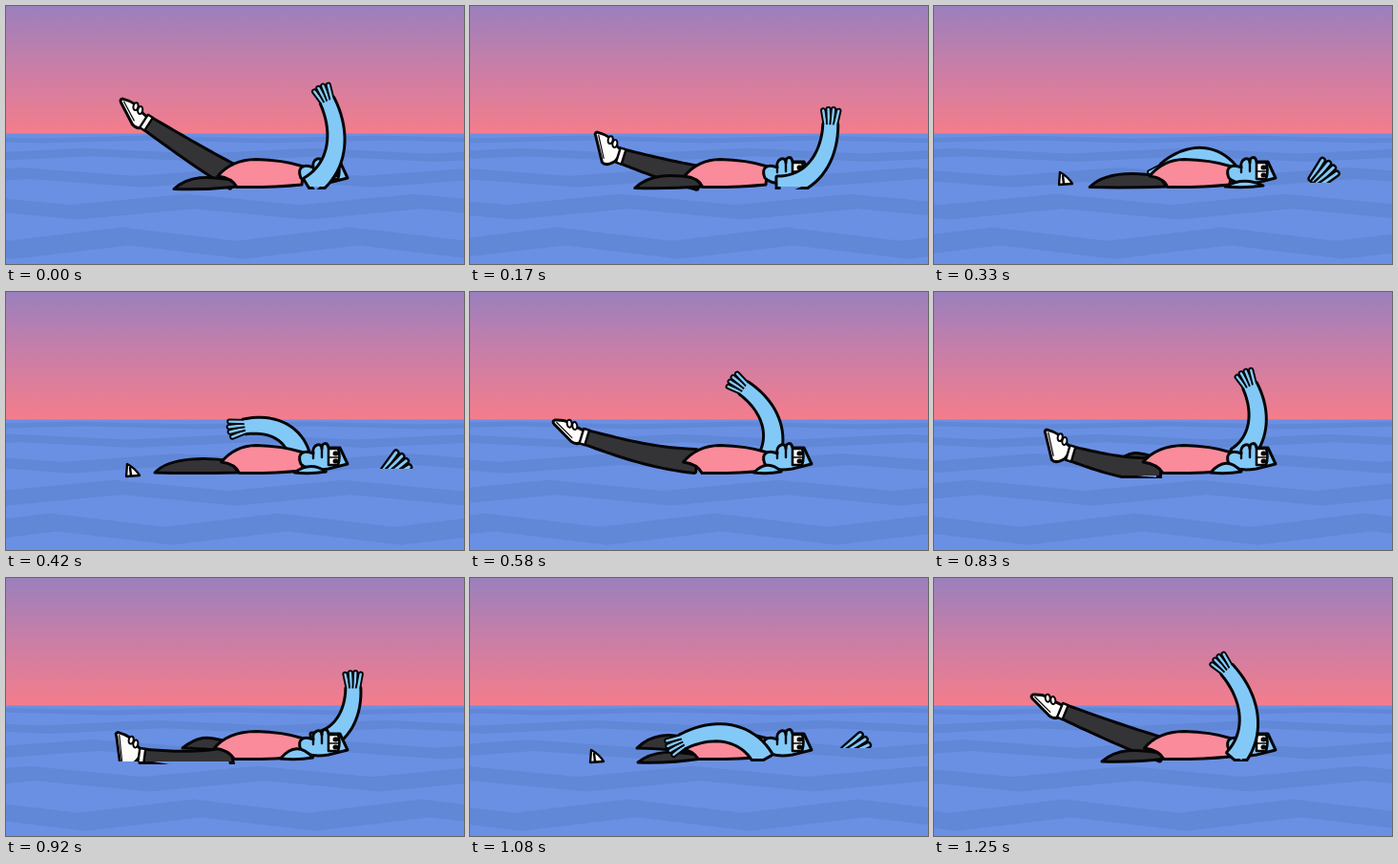
Write an HTML page with a canvas that moves like this. It is 480 by 270 pixels and loops after 1330 ms.

```html
<!DOCTYPE html>
<html lang="en">
<head>
<meta charset="utf-8">
<title>Backstroke</title>
<style>
  html, body { margin: 0; width: 100%; height: 100%; overflow: hidden; background: #6a90e4; }
  canvas { display: block; width: 480px; height: 270px; }
</style>
</head>
<body>
<canvas id="stage" width="480" height="270"></canvas>
<script>
const ctx = document.getElementById('stage').getContext('2d');
const LOOP = 1330, STEPS = 16, HALF = STEPS / 2;
const INK = '#050507', SKIN = '#83c9f8', SUIT = '#f98b9b', LEG = '#343436', WHITE = '#fffdfa';
const startOf = i => Math.round(i * 100 / 12) * 10;   // twelve drawings a second
const mix = (a, b, t) => a + (b - a) * t;

// Arm angle in degrees by stroke step: 180 at the hips, 90 straight up, 0 overhead.
const NEAR_ARM = { sweep: [[-4, 184], [-3, 171], [-1, 93], [0, 74], [2, 43], [4, 2], [5, -2]], rx: 90, grow: 0, y: 189, bend: 24 };
const FAR_ARM = { sweep: [[-5, 190], [-4, 171], [-1, 109], [2, 76], [5, 2]], rx: 78, grow: 8, y: 173, bend: 19 };
const NEAR_LEG = { x: 132, top: 134, hipX: 236, hipY: 180, sink: 3, sag: 7, width: 22 };
const FAR_LEG = { x: 147, top: 122, hipX: 240, hipY: 180, sink: 0, sag: 2, width: 22 };

function sweepAt(keys, p) {
  for (let k = 1; k < keys.length; k++) {
    const [p0, a0] = keys[k - 1], [p1, a1] = keys[k];
    if (p >= p0 && p <= p1) return mix(a0, a1, (p - p0) / (p1 - p0));
  }
  return null;
}

function shape(d, fill, w = 3) {
  const path = new Path2D(d);
  if (fill) { ctx.fillStyle = fill; ctx.fill(path); }
  if (w) { ctx.strokeStyle = INK; ctx.lineWidth = w; ctx.stroke(path); }
}

function above(y, paint) {
  ctx.save();
  ctx.beginPath();
  ctx.rect(0, 0, 480, y);
  ctx.clip();
  paint();
  ctx.restore();
}

// Tapered outline along a cubic curve.
function ribbon([a, b, c, d], w0, w1) {
  const left = [], right = [];
  for (let k = 0; k <= 20; k++) {
    const t = k / 20, s = 1 - t;
    const at = j => s * s * s * a[j] + 3 * s * s * t * b[j] + 3 * s * t * t * c[j] + t * t * t * d[j];
    const slope = j => s * s * (b[j] - a[j]) + 2 * s * t * (c[j] - b[j]) + t * t * (d[j] - c[j]);
    const h = mix(w0, w1, t) / 2 / Math.hypot(slope(0), slope(1));
    left.push([at(0) - slope(1) * h, at(1) + slope(0) * h]);
    right.unshift([at(0) + slope(1) * h, at(1) - slope(0) * h]);
  }
  return 'M' + left.concat(right).join('L') + 'Z';
}

function hand([x, y], dir, size = 1) {
  ctx.save();
  ctx.translate(x, y);
  ctx.rotate(dir);
  ctx.scale(size, size);
  for (let k = -1.5; k <= 1.5; k++) {
    const len = 17 - Math.abs(k) * 1.5;
    for (const [w, c] of [[6.2, INK], [2.4, SKIN]]) {
      ctx.beginPath();
      ctx.moveTo(-3, k * 3);
      ctx.lineTo(len, k * 5.4);
      ctx.lineWidth = w;
      ctx.strokeStyle = c;
      ctx.stroke();
    }
  }
  ctx.restore();
}

function arm(o, p, water) {
  const deg = sweepAt(o.sweep, p);
  if (deg === null) return;
  const cos = Math.cos(deg * Math.PI / 180), sin = Math.sin(deg * Math.PI / 180);
  const s = [316 + 9 * cos, o.y];
  const w = [312 + (o.rx + o.grow * cos) * cos, 185 - 89 * sin];
  const dx = w[0] - s[0], dy = w[1] - s[1], len = Math.hypot(dx, dy);
  const bow = t => [s[0] + dx * t - dy / len * o.bend, s[1] + dy * t + dx / len * o.bend];
  const c = bow(0.65), dir = Math.atan2(w[1] - c[1], w[0] - c[0]);
  if (deg < 15) {
    above(water - 4, () => hand(w, dir, 1.25));
    return;
  }
  const path = ribbon([s, bow(0.25), c, w], 19, 13);
  above(water + 3, () => { shape(path, null, 6); hand(w, dir); });
  above(water, () => shape(path, SKIN, 0));
}

function shoe(x, y, angle, heel) {
  ctx.save();
  ctx.translate(x, y);
  ctx.rotate(angle * Math.PI / 180);
  // Laces on +y, sole on -y.
  shape(`M0,7 L8,6 Q20,9 33,0 Q35,-3 31,-4 L6,${-heel} Q0,${-heel} -2,-6 Z`, WHITE);
  shape(`M30,-1 L8,${4 - heel}`, null, 1.2);
  for (const k of [0, 1]) {
    ctx.beginPath();
    ctx.ellipse(12 + k * 6, 6 - k, 4, 2.5, 0.9, 0, 7);
    ctx.fillStyle = WHITE;
    ctx.fill();
    ctx.lineWidth = 2;
    ctx.stroke();
  }
  ctx.restore();
}

// A kick peaks at step 0; after step 3 only the toe is out of the water.
function leg(o, q) {
  if (q === 4 || q === 5) {
    const x = 137 - 5 * q + 15, y = 163 + 6 * q;
    shape(`M${x},${y - 13} Q${x + 8},${y - 9} ${x + 13},${y - 1} L${x - 1},${y} Z M${x + 3},${y - 9} L${x + 4},${y - 1}`, WHITE, 2.4);
  }
  if (q < -2 || q > 3) return;
  const hip = [o.hipX, o.hipY + o.sink * q];
  const foot = [o.x + 10 * q - 2.2 * q * q, o.top + 17.5 * Math.abs(q)];
  const along = (t, sag) => [mix(hip[0], foot[0], t), mix(hip[1], foot[1], t) + sag];
  const c = along(0.72, o.sag * 0.4);
  const path = ribbon([hip, along(0.4, o.sag), c, foot], o.width, 12);
  above(195, () => shape(path, null, 6));
  above(192, () => {
    shape(path, LEG, 0);
    shoe(foot[0] - 3, foot[1], 229 + Math.min(0, 17 * q), 10 + 3.5 * Math.max(0, q));
    ctx.save();
    ctx.translate(...foot);
    ctx.rotate(Math.atan2(foot[1] - c[1], foot[0] - c[0]));
    shape('M-3,-8 L3,-8 L3,8 L-3,8 Z', WHITE, 2.4);
    ctx.restore();
  });
}

function thigh(x, y, top, endX, endY) {
  shape(`M${x},${y} C${x + 16},${top - 1} 212,${top} ${endX - 6},${top + 4} L${endX},${endY} Q${x + 35},${y + 1} ${x},${y} Z`, LEG);
}

function sea(i) {
  const sky = ctx.createLinearGradient(0, 0, 0, 134);
  sky.addColorStop(0, '#9a80bd');
  sky.addColorStop(0.5, '#cb7ea6');
  sky.addColorStop(1, '#f47d8b');
  ctx.fillStyle = sky;
  ctx.fillRect(0, 0, 480, 134);
  ctx.fillStyle = '#6a90e4';
  ctx.fillRect(0, 134, 480, 136);
  ctx.globalAlpha = 0.5;
  ctx.fillRect(0, 133, 480, 1);
  ctx.globalAlpha = 1;

  // Zigzag bands grow towards the viewer and drift one period per loop.
  const period = 240;
  for (let k = 0; k < 5; k++) {
    const y = 137 + 11 * k + 3.6 * k * k, thick = 5 + 3.5 * k, amp = 1.5 + 1.4 * k;
    const start = (121 + (4 - k) * 67) % period - period * 2 - i / STEPS * period;
    const top = [], bottom = [];
    for (let n = 0; n < 12; n++) {
      const x = start + n * period / 2, dy = n % 2 ? amp : -amp;
      top.push([x, y + dy]);
      bottom.unshift([x + 8, y + thick + dy]);
    }
    shape('M' + top.concat(bottom).join('L') + 'Z', '#6188d7', 0);
  }
}

function head() {
  shape('M309,180 C304,168 313,165 322,169 C320,160 331,156 331,164 C331,157 337,157 338,163 L350,163 L358,180 L338,185 C325,187 315,186 309,180 Z', SKIN);
  shape('M322,168 V174 M331,163 V173', null, 2.4);
  shape('M338,164 H348 Q351,172 348,181 H338 Z', WHITE, 2.6);
  shape('M345,169 h1 M345,177 h1', null, 5);
  shape('M339,173 H349', null, 1.4);
}

function torso(i) {
  const d = 4 * Math.sin(2 * Math.PI * i / STEPS), x = 222 + d;
  shape(`M${x},178 Q${236 + d},161 262,160.5 Q290,161 312,168 L310,187 Q280,190 ${242 + d * 0.7},189.5 Q${237 + d},180 ${x},178 Z`, SUIT);
}

function shoulder(k) {
  const a = 305 - 2.5 * k, b = 321 + 24 * 0.6 ** k, m = (a + b) / 2;
  shape(`M${a},189 Q${m},${178 - 1.3 * k} ${b},188 Q${m},191 ${a},189 Z`, SKIN);
}

function draw(i) {
  const near = i >= 12 ? i - STEPS : i, far = i - HALF;
  ctx.lineCap = ctx.lineJoin = 'round';
  sea(i);
  arm(FAR_ARM, far, 182);
  leg(FAR_LEG, near);
  if (far >= 0 && far < 6) thigh(200 - 5 * far, 178, 170 - 1.4 * far, 232, 182);
  leg(NEAR_LEG, far);
  if (near < 6) thigh(176 - 0.8 * Math.max(0, near) ** 2, 191.5 - 0.5 * near, 178 - near, 243, 189);
  torso(i);
  head();
  if (near >= 4) shoulder(near - 4);
  arm(NEAR_ARM, near, 189);
}

let last = -1;
function tick(now) {
  const t = now % LOOP;
  let i = STEPS - 1;
  while (startOf(i) > t) i--;
  if (i !== last) draw(last = i);
  requestAnimationFrame(tick);
}
draw(0);
requestAnimationFrame(tick);
</script>
</body>
</html>
```
